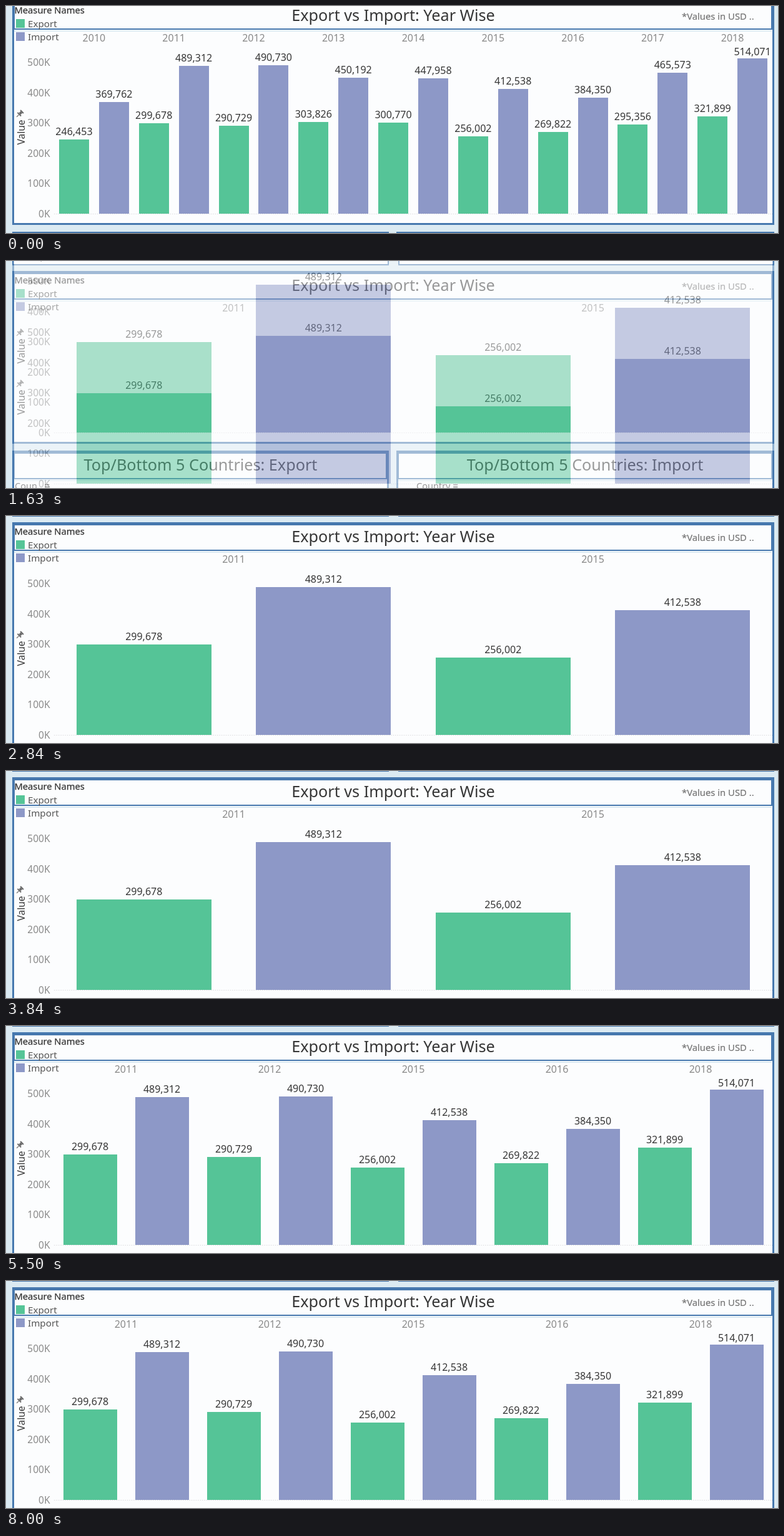
Write an HTML page with a canvas that moves like this. It is 1236 px wide and 364 px high and loops after 8080 ms.

```html
<!DOCTYPE html>
<html lang="en">
<head>
<meta charset="utf-8">
<title>Export vs Import</title>
<style>
  html, body { margin: 0; width: 100%; height: 100%; overflow: hidden; background: #dbeaf2; }
  canvas { display: block; }
</style>
</head>
<body>
<canvas id="stage" width="1236" height="364"></canvas>
<script>
const W = 1236, H = 364, LOOP = 8080;
const GREEN = '#55c497', PURPLE = '#8d98c7', PAGE = '#dbeaf2', PAPER = '#fcfdfe';
const LINE = '#4678ae', DARK = '#363636', SOFT = '#8a8a8a', PIN = '#6a6a6a';
const FONT = '"Noto Sans", "Open Sans", sans-serif';
const LEFT = 77, PLOT = 1150, ZERO = 333.5, PER_K = 0.486;

// Year: [export, import]
const trade = {
  2010: [246453, 369762], 2011: [299678, 489312], 2012: [290729, 490730],
  2013: [303826, 450192], 2014: [300770, 447958], 2015: [256002, 412538],
  2016: [269822, 384350], 2017: [295356, 465573], 2018: [321899, 514071]
};
const ALL = Object.keys(trade), PAIR = [2011, 2015], FIVE = [2011, 2012, 2015, 2016, 2018];

const stage = document.getElementById('stage').getContext('2d');
const layer = document.createElement('canvas');
layer.width = W;
layer.height = H;
const c = layer.getContext('2d');

function rect(x, y, w, h, color) {
  c.fillStyle = color;
  c.fillRect(x, y, w, h);
}

function text(str, x, y, size, color = DARK, align = 'left', weight = 0) {
  c.font = `${size}px ${FONT}`;
  c.textAlign = align;
  c.fillStyle = c.strokeStyle = color;
  c.fillText(str, x, y);
  if (weight) {
    c.lineWidth = weight;
    c.strokeText(str, x, y);
  }
}

function frameBox(x1, y1, x2, y2, edge) {
  rect(x1, y1, x2 - x1, y2 - y1, LINE);
  rect(x1 + edge, y1 + edge, x2 - x1 - 2 * edge, y2 - y1 - 2 * edge, PAPER);
}

// A bordered panel with a bordered heading at its top
function panel(x1, y1, x2, y2, title, mid) {
  frameBox(x1, y1, x2, y2, 3);
  frameBox(x1 + 2, y1 + 3, x2 - 3, y1 + 46, 2);
  rect(x1 + 3, y1 + 47, x2 - x1 - 7, 2, PAGE);
  text(title, mid, y1 + 32, 25.2, DARK, 'center');
}

function pin(x, y) {
  c.save();
  c.translate(x, y);
  c.rotate(Math.PI / 4);
  rect(-3.5, -6, 7, 2, PIN);
  rect(-2, -4, 4, 4, PIN);
  rect(-4, 0, 8, 2, PIN);
  rect(-0.6, 2, 1.2, 5, PIN);
  c.restore();
}

function bars(years) {
  const pitch = PLOT / years.length, width = Math.round(pitch * 0.375);
  years.forEach((year, i) => {
    const x = LEFT + i * pitch;
    text(year, x + pitch / 2, 57, 16, SOFT, 'center');
    trade[year].forEach((value, k) => {
      const mid = x + pitch * (0.25 + k / 2);
      const top = Math.round(ZERO - value / 1000 * PER_K);
      rect(Math.round(mid - width / 2), top, width, 333 - top, k ? PURPLE : GREEN);
      text(value.toLocaleString('en-US'), mid, Math.max(79, top - 7), 16, DARK, 'center');
    });
  });
}

function drawPage(years, scroll) {
  c.setTransform(1, 0, 0, 1, 0, 0);
  rect(0, 0, W, H, PAGE);
  c.translate(0, scroll);

  // Neighbouring panels above and below
  frameBox(10, -300, 613, -17, 2);
  frameBox(628, -300, 1230, -17, 2);
  panel(10, 362, 613, 700, 'Top/Bottom 5 Countries: Export', 311.5);
  panel(625, 362, 1230, 700, 'Top/Bottom 5 Countries: Import', 927);
  text('Coun.. \u2261', 14, 424, 14.5);
  text('Country \u2261', 657, 424, 14.5);

  // Main panel
  panel(10, -8, 1230, 351, 'Export vs Import: Year Wise', 620);
  text('*Values in USD ..', 1082, 22, 14.8, '#757575', 'left', 0.2);
  text('Measure Names', 13.5, 11.5, 14.7, DARK, 'left', 0.25);
  rect(16, 21, 14, 14, GREEN);
  rect(16, 42, 14, 14, PURPLE);
  text('Export', 35, 34, 15.2, '#555');
  text('Import', 35, 55, 15.2, '#555');

  for (let k = 0; k <= 500; k += 100) {
    text(k + 'K', 70.5, 339 - k * PER_K, 15.5, SOFT, 'right');
  }
  for (let x = LEFT; x < LEFT + PLOT; x += 3) rect(x, 333, 1, 1, '#d0d0d4');
  pin(22, 173);
  c.save();
  c.translate(29.5, 202.5);
  c.rotate(-Math.PI / 2);
  text('Value', 0, 0, 15.5, DARK, 'center');
  c.restore();

  bars(years);
}

function show(years, scroll, alpha = 1) {
  drawPage(years, scroll);
  stage.globalAlpha = alpha;
  stage.drawImage(layer, 0, 0);
}

function frame() {
  const t = performance.now() % LOOP;
  if (t < 1590) show(ALL, 0);
  else if (t < 5500) {
    if (t < 1670) show(PAIR, -58);
    if (t >= 1630) {
      const left = Math.max(0, 1 - Math.max(0, t - 1670) / 330);
      show(PAIR, Math.round(18 + 6 * left * left), t < 1670 ? 0.5 : 1);
    }
  } else show(FIVE, 18);
  requestAnimationFrame(frame);
}
frame();
</script>
</body>
</html>
```
